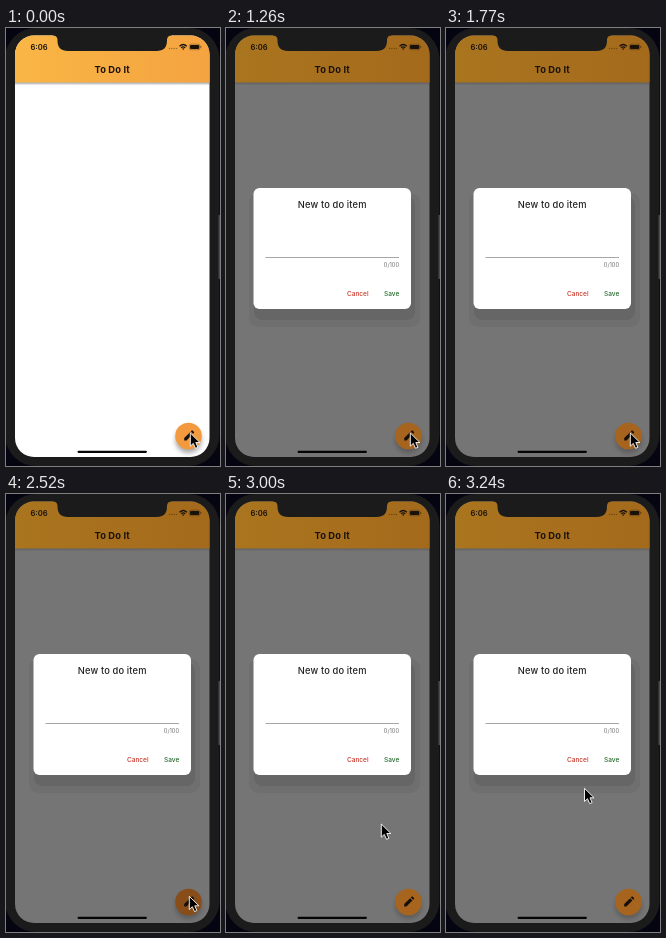
Animation, 214 px wide and 438 px high, one loop 3300 ms. Source, as an HTML page:

```html
<!DOCTYPE html>
<html lang="en">
<head>
<meta charset="utf-8">
<title>To Do It</title>
<style>
html, body { margin: 0; width: 100%; height: 100%; overflow: hidden; background: #050512; }
svg { display: block; width: 214px; height: 438px; font-family: Inter, Roboto, sans-serif; }
</style>
</head>
<body>
<svg viewBox="0 0 214 438">
  <defs>
    <linearGradient id="bright">
      <stop stop-color="#f9b645"/><stop offset="1" stop-color="#f4a340"/>
    </linearGradient>
    <linearGradient id="dim">
      <stop stop-color="#aa751f"/><stop offset="1" stop-color="#a46a1c"/>
    </linearGradient>
    <linearGradient id="barShadow" x2="0" y2="1">
      <stop stop-opacity=".34"/><stop offset="1" stop-opacity="0"/>
    </linearGradient>
    <clipPath id="screen"><rect x="9" y="7.5" width="194.5" height="421.5" rx="19"/></clipPath>
    <filter id="soft" x="-50%" y="-50%" width="200%" height="200%"><feGaussianBlur stdDeviation="2.5"/></filter>
  </defs>

  <rect x="-1" width="214.5" height="438" rx="31" fill="#1b1b1c"/>
  <rect x="212.5" y="187" width="1.5" height="64" fill="#4a4a4c"/>

  <g clip-path="url(#screen)">
    <rect id="page" x="8" y="7" width="197" height="423"/>
    <rect id="bar" x="8" y="7" width="197" height="47.5"/>
    <rect id="edge" x="8" y="54.5" width="197" height="3" fill="url(#barShadow)"/>
    <g id="shade" fill="#000">
      <rect x="23" y="165" width="171" height="134" rx="9" opacity=".055"/>
      <rect x="28" y="169" width="161" height="123" rx="8" opacity=".08"/>
    </g>
    <circle id="fabShadow" cx="182.5" cy="412" r="13" filter="url(#soft)"/>
    <circle id="fab" cx="182.5" cy="408" r="13.3"/>
    <path d="M178.2 410.1 184.1 404.2 186.4 406.5 180.5 412.4H178.2ZM184.8 403.5 185.7 402.6Q186.2 402.2 186.7 402.6L188 403.9Q188.4 404.4 188 404.9L187.1 405.8Z" fill="#17100a"/>
  </g>

  <path d="M47 7.5Q51 7.5 51.5 11.5V12.5Q51.5 23 62 23H150.5Q161 23 161 12.5V11.5Q161.5 7.5 165.5 7.5V6H47Z" fill="#1b1b1c"/>

  <g fill="#1a1209">
    <text x="24.5" y="21.8" font-size="7.6" font-weight="600">6:06</text>
    <text x="106.2" y="44.7" font-size="9.3" font-weight="700" text-anchor="middle" letter-spacing=".15">To Do It</text>
    <g opacity=".4">
      <circle cx="163.5" cy="20.5" r=".7"/><circle cx="165.8" cy="20.5" r=".7"/>
      <circle cx="168.1" cy="20.5" r=".7"/><circle cx="170.4" cy="20.5" r=".7"/>
    </g>
    <path d="M173.5 18.2Q177.2 14.8 180.9 18.2M175.1 19.8Q177.2 17.9 179.3 19.8" fill="none" stroke="#1a1209" stroke-width="1.2"/>
    <path d="M176 20.8Q177.2 19.9 178.4 20.8L177.2 22Z"/>
    <rect x="183.3" y="16.2" width="10.6" height="5.6" rx="1.6" fill="none" stroke="#1a1209" stroke-width=".5" opacity=".6"/>
    <rect x="184" y="16.9" width="9.2" height="4.2" rx="1"/>
    <rect x="194.5" y="18" width=".8" height="2" rx=".4" opacity=".6"/>
  </g>
  <rect x="71.5" y="422.7" width="69.5" height="2.3" rx="1.15" fill="#050505"/>

  <g id="dialog">
    <rect x="27.5" y="160" width="157.5" height="121" rx="6" fill="#fff"/>
    <text x="106.2" y="180" font-size="9.3" font-weight="500" text-anchor="middle" letter-spacing=".15" fill="#222">New to do item</text>
    <path d="M39.5 229.5H173" stroke="#8e9294" stroke-width=".8"/>
    <text x="173" y="238.8" font-size="5.7" text-anchor="end" fill="#777">0/100</text>
    <g font-size="6.5" font-weight="500">
      <text x="121" y="268.3" fill="#c9392c">Cancel</text>
      <text x="158" y="268.3" fill="#25692c">Save</text>
    </g>
  </g>

  <path id="cursor" d="M0 0V13.2L3 10.4 5.2 15.3 7.6 14.3 5.5 9.5H9.6Z" fill="#000" stroke="#fff" stroke-width=".9" stroke-linejoin="round"/>
</svg>
<script>
const LOOP = 3300, OPEN = 1260, MOVE = 2520, STEP = 60;
const el = id => document.getElementById(id);
const paint = (id, name, value) => el(id).setAttribute(name, value);
const show = (id, on) => paint(id, 'visibility', on ? 'visible' : 'hidden');
const mix = (a, b, t) => a + (b - a) * t;

function cursorAt(ms) {
  if (ms < MOVE) return [184.3, 405];
  const t = Math.floor((ms - MOVE) / STEP) * STEP;
  return t < 480
    ? [mix(183.3, 155.3, t / 480), mix(402.3, 330, t / 480)]
    : [mix(155.3, 138.5, Math.min(1, (t - 480) / 240)), mix(330, 294.3, Math.min(1, (t - 480) / 240))];
}

function draw(ms) {
  const open = ms >= OPEN;
  const pressed = ms >= MOVE && ms < MOVE + STEP;
  paint('page', 'fill', open ? '#757575' : '#fff');
  paint('bar', 'fill', `url(#${open ? 'dim' : 'bright'})`);
  paint('fab', 'fill', pressed ? '#884d18' : open ? '#a7641f' : '#f39a3e');
  paint('fabShadow', 'opacity', open ? .22 : .35);
  paint('edge', 'opacity', open ? .5 : 1);
  show('shade', open);
  show('dialog', open);
  paint('cursor', 'transform', `translate(${cursorAt(ms)})`);
}

function tick() {
  draw(performance.now() % LOOP);
  requestAnimationFrame(tick);
}
tick();
</script>
</body>
</html>
```
